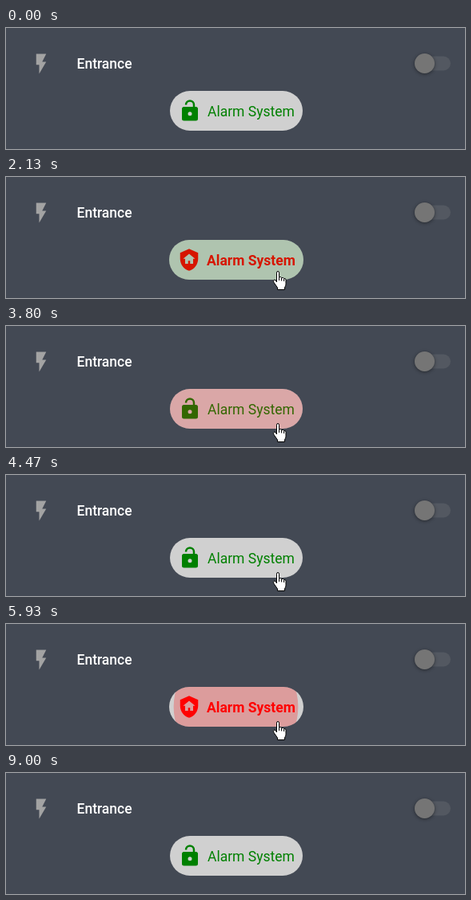
An HTML page for the animation above (9070 ms loop, 574 by 152 pixels).

```html
<!DOCTYPE html>
<html lang="en">
<head>
<meta charset="utf-8">
<title>Alarm button</title>
<style>
  html, body { margin: 0; width: 100%; height: 100%; overflow: hidden; background: #434954; }
  svg { display: block; }
  text { font: 17.5px Roboto, sans-serif; }
  .label { font-weight: 500; }
  .bold { font-weight: 700; }
  .cursor { fill: #fff; stroke: #000; stroke-linejoin: round; }
  .knob { filter: drop-shadow(0 1px 2px rgba(0, 0, 0, .45)); }
</style>
</head>
<body>
<svg width="574" height="152" viewBox="0 0 574 152">
  <path fill="#a3a3a3" transform="translate(29 30) scale(1.25)" d="M7 2V13H10V22L17 10H13L17 2Z"/>
  <text class="label" x="88.5" y="51" fill="#fff">Entrance</text>
  <rect x="511" y="35.5" width="45" height="18" rx="9" fill="#535861"/>
  <circle class="knob" cx="523.5" cy="44.5" r="12.5" fill="#757575"/>

  <clipPath id="pill"><rect id="pillShape" y="79" height="50" rx="25"/></clipPath>
  <g clip-path="url(#pill)">
    <rect x="200" y="79" width="180" height="50" fill="#d0d0d0"/>
    <g id="off" fill="#008000">
      <path transform="translate(215 89) scale(1.25)" d="M18 8A2 2 0 0 1 20 10V20A2 2 0 0 1 18 22H6A2 2 0 0 1 4 20V10A2 2 0 0 1 6 8H15V6A3 3 0 0 0 9 6H7A5 5 0 0 1 17 6V8ZM12 17A2 2 0 0 0 12 13A2 2 0 0 0 12 17Z"/>
      <text x="252" y="111">Alarm System</text>
    </g>
    <g id="on" fill="#f00">
      <path fill-rule="evenodd" transform="translate(214 89) scale(1.25)" d="M11 13H13V16H16V11H18L12 6L6 11H8V16H11ZM12 1L21 5V11C21 16.55 17.16 21.74 12 23C6.84 21.74 3 16.55 3 11V5Z"/>
      <text class="bold" x="251" y="111">Alarm System</text>
    </g>
    <circle id="wave" cx="287.5" cy="104"/>
  </g>

  <path id="arrow" class="cursor" d="M.5 .5V16.5L4.2 13L6.6 18.5L9 17.5L6.6 12H11.7Z"/>
  <g id="hand" class="cursor">
    <path d="M4.5 14V2.2q0-1.7 1.5-1.7t1.5 1.7V7.8q2.9-.9 3.1 .9q2.7-.9 3 .9q2.4-.6 2.4 1.7V16.5q0 2-1.5 4.5V23.5H5.5V21L1 14.5Q-.4 12 1.4 11.2T4.5 14Z"/>
    <path fill="none" d="M7.5 8v4M10.6 9v3.5M13.6 10v3"/>
  </g>
</svg>
<script>
const LOOP = 9070, STEP = 200 / 3;
const PRESSES = [1690, 3410, 4796, 5823];
const HOLD = 270, FADE_DELAY = 60;
const $ = id => document.getElementById(id);

const progress = (t, from, to) => Math.min(1, Math.max(0, (t - from) / (to - from)));
const easeOut = k => Math.sin(k * Math.PI / 2);
const easeIn = k => 1 - Math.cos(k * Math.PI / 2);
const easeInOut = k => k * k * (3 - 2 * k);

// arc in from below, small drift on the button, arc out to the lower right
function cursorAt(t) {
  const enter = progress(t, 560, 1333), leave = progress(t, 6900, 8000);
  const x = 438 - 92 * easeIn(enter) - 6 * progress(t, 1333, 1533) + 201 * easeOut(leave);
  const y = 153 - 41 * easeOut(enter) + 10 * easeInOut(progress(t, 1333, 2800)) + 31 * easeIn(leave);
  return [Math.round(x), Math.round(y)];
}

function show(id, visible) {
  $(id).setAttribute('display', visible ? 'inline' : 'none');
}

function set(id, attributes) {
  for (const name in attributes) $(id).setAttribute(name, attributes[name]);
}

function draw(now) {
  const t = Math.floor((now % LOOP + 5) / STEP) * STEP;

  // each release toggles the alarm
  const armed = PRESSES.filter(p => t >= p + HOLD).length % 2 === 1;
  show('on', armed);
  show('off', !armed);
  set('pillShape', { x: armed ? 204 : 205, width: armed ? 168 : 166 });

  // ripple grows from the centre, then fades after release
  const n = PRESSES.filter(p => t >= p).length - 1;
  show('wave', n >= 0);
  if (n >= 0) {
    const age = t - PRESSES[n];
    set('wave', {
      r: 198 * (1 - 80 ** (-age / 968)),
      fill: n % 2 ? '#f00' : '#008000',
      opacity: .25 * (1 - progress(age - HOLD - FADE_DELAY, 0, 312))
    });
  }

  const [x, y] = cursorAt(t);
  const over = x > 204 && x < 372 && y > 78 && y < 129;
  show('hand', over);
  show('arrow', !over);
  set('hand', { transform: `translate(${x - 6} ${y})` });
  set('arrow', { transform: `translate(${x} ${y})` });
}

const start = performance.now();
function tick() {
  draw(performance.now() - start);
  requestAnimationFrame(tick);
}
tick();
</script>
</body>
</html>
```
